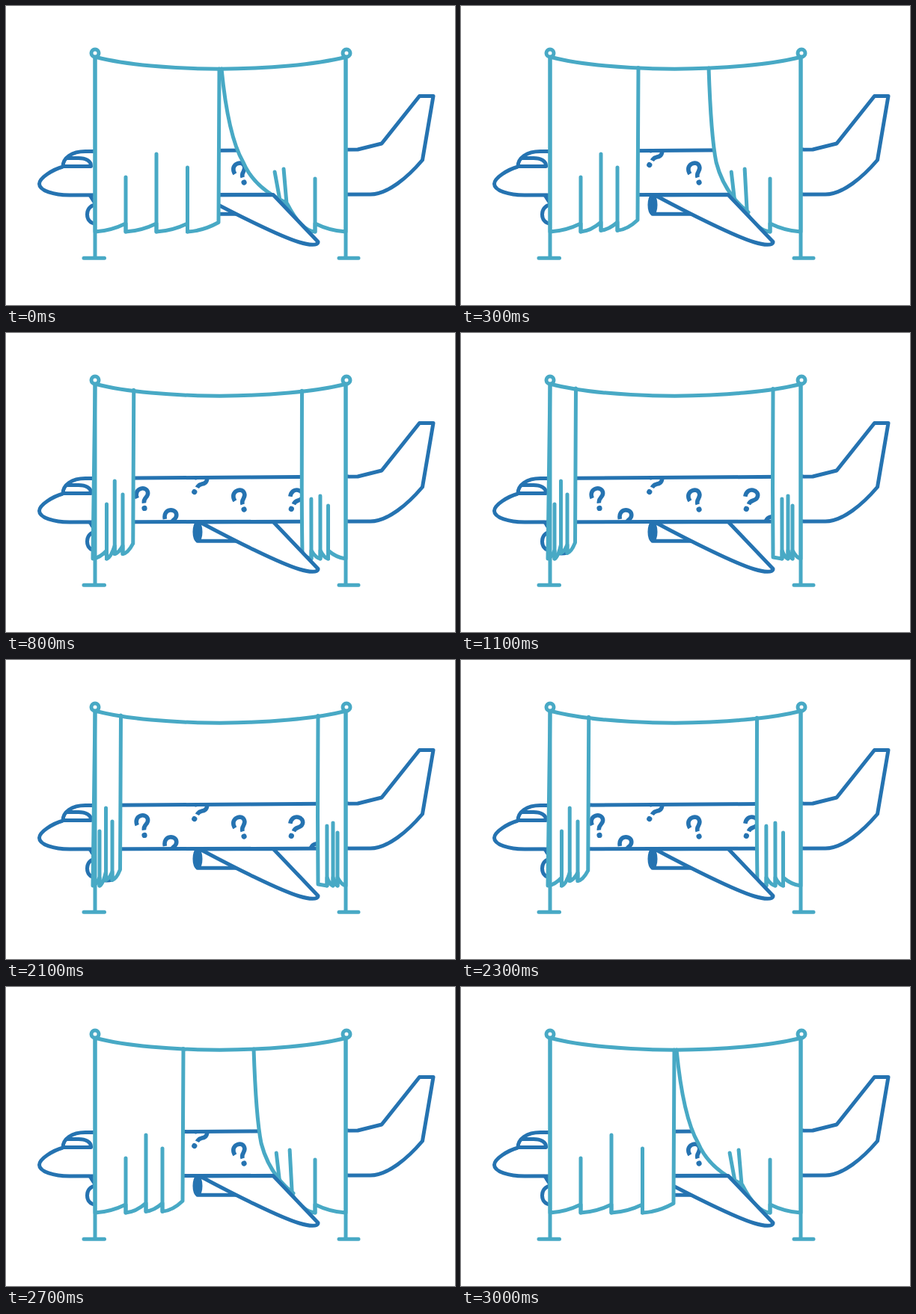
Write an HTML page that moves like this. It is 600 px wide and 400 px high and loops after 3.6 s.

```html
<!DOCTYPE html>
<html lang="en">
<head>
<meta charset="utf-8">
<title>Plane behind a curtain</title>
<style>
  html, body { margin: 0; width: 100%; height: 100%; overflow: hidden; background: #fff; }
  svg { display: block; width: 600px; height: 400px; fill: none; stroke-width: 5; stroke-linejoin: round; }
  .plane { stroke: #2573b1; }
  .cloth { stroke: #48a9c5; stroke-linecap: round; }
  .solid { fill: #fff; }
</style>
</head>
<body>
<svg viewBox="0 0 600 400">
  <defs>
    <clipPath id="body"><rect x="119" y="195" width="336" height="56"/></clipPath>
    <g id="ask" stroke-width="5.6">
      <path d="M-7.600 4.500C-10.800 -10.300 7.800 -10.800 7.800 -1C7.800 6 .5 4.500 .5 12.300"/>
      <circle cy="19.2" r="3.6" fill="#2573b1" stroke="none"/>
    </g>
  </defs>

  <g class="plane">
    <path d="M76 215C76 203 88 194.500 106 194.500L470 192L502 184L552.500 120.500H571L556.500 206C537 229 510 252 487 252L85 253C64 253 44.500 247 44.500 238C44.500 230 62 219 76 215"/>
    <path d="M75 214.500H113.500C114 207 106 203.500 97 203.500H80"/>
    <path d="M112 253L119 264M119 266C105 268 105 290 119 291Q130 297 142 294"/>
    <g id="asks" clip-path="url(#body)"></g>
    <path d="M256 254V278.300H310"/>
    <ellipse cx="256" cy="266" rx="4" ry="11.500" fill="#2573b1"/>
  </g>
  <g class="cloth" id="right"><path class="solid"/><path/></g>
  <path class="plane solid" d="M259 253C300 275 365 308 392 316C405 320 417 321 417 315.500L357 252.500Z"/>
  <g class="cloth" id="left"><path class="solid"/><path/></g>
  <g class="cloth">
    <path d="M119 68C200 89.500 370 89.500 455 68M119 68V337M104 337.300H131.500M454 68V337M445 337.300H471"/>
    <circle class="solid" cx="119" cy="63" r="5"/>
    <circle class="solid" cx="455" cy="63" r="5"/>
  </g>
</svg>
<script>
  const FLOOR = 302; // lowest point of the hem
  const LIFT = 11;   // rise of each scallop above a fold's end

  const marks = [[182, 215.5, -9], [220, 244.5, 0], [260.5, 195.5, 27], [311.5, 218, -20], [388.5, 217.5, 22], [415, 253.5, -10]];
  document.getElementById('asks').innerHTML = marks.map(([x, y, a]) =>
    `<use href="#ask" transform="translate(${x} ${y}) rotate(${a})"/>`).join('');

  const mix = (a, b, k) => a + (b - a) * k;
  const ropeY = x => 84 - 16 * ((x - 287) / 168) ** 2;

  // Value of a track with one key for each pose, from closed (0) to open (3)
  function at(p, ...keys) {
    const i = Math.floor(p);
    return mix(keys[i], keys[Math.min(i + 1, 3)], p - i);
  }

  // Scalloped hem from the pole over the folds to the inner edge
  function drawCurtain(id, { pole, start, folds, tops, lean, end: [ex, ey], edge }) {
    let x = start, y = FLOOR, cloth = `M${pole} 70L${x} ${y}`, lines = '';
    const scallop = (nx, ny) => `Q${(x + nx) / 2} ${y - 1} ${nx} ${ny}`;
    folds.forEach((fx, i) => {
      const fy = i ? Math.min(FLOOR, ey + 14) : FLOOR;
      cloth += `${scallop(fx, fy - LIFT)}V${fy}`;
      lines += `M${fx - lean * i / 2} ${tops[i]}L${fx} ${fy}`;
      [x, y] = [fx, fy];
    });
    cloth += scallop(ex, ey) + edge;
    const [clothPath, foldPath] = document.getElementById(id).children;
    clothPath.setAttribute('d', cloth);
    foldPath.setAttribute('d', lines);
  }

  function drawLeft(p) {
    const x = at(p, 284, 236, 187, 152.5);
    drawCurtain('left', {
      pole: 119,
      start: at(p, 119, 119, 116, 116),
      folds: [at(p, 160, 160, 144, 125), at(p, 201, 187, 157, 133.5), at(p, 242.5, 209, 170, 142)],
      tops: [229, 198, 216],
      lean: 0,
      end: [x, 278 + 0.07 * (x - 119)],
      edge: `L${x + 1} ${ropeY(x + 1)}`
    });
  }

  // The right edge swoops over a knee and tucks behind the wing
  function drawRight(p) {
    const top = 288 + 43 * p, kneeY = 209;
    const knee = at(p, 317, 341, 374, 416.5);
    const x = at(p, 372, 384, 375, 417), y = at(p, 262, 276, 290, 300);
    drawCurtain('right', {
      pole: 454,
      start: 454,
      folds: [at(p, 413, 413, 418, 443), at(p, 376, 383, 403, 437), at(p, 369, 369, 387, 429)],
      tops: [231, 218, 222],
      lean: (x - knee) * 0.18,
      end: [x, y],
      edge: `Q${mix(knee, x, 0.25)} ${mix(kneeY, y, 0.62)} ${knee} ${kneeY}` +
        `Q${mix(top, knee, 0.3)} 174 ${top} ${ropeY(top)}`
    });
  }

  // Opens in three stepped pulls, then closes the same way in reverse
  function poseAt(t) {
    const s = Math.min(t, 3199.9 - t) - 200;
    if (s < 0) return 0;
    return Math.min(3, Math.floor(s / 300) + (s % 300 < 100 ? 0.5 : 1));
  }

  function frame() {
    const p = poseAt(performance.now() % 3600);
    drawLeft(p);
    drawRight(p);
    requestAnimationFrame(frame);
  }
  frame();
</script>
</body>
</html>
```
